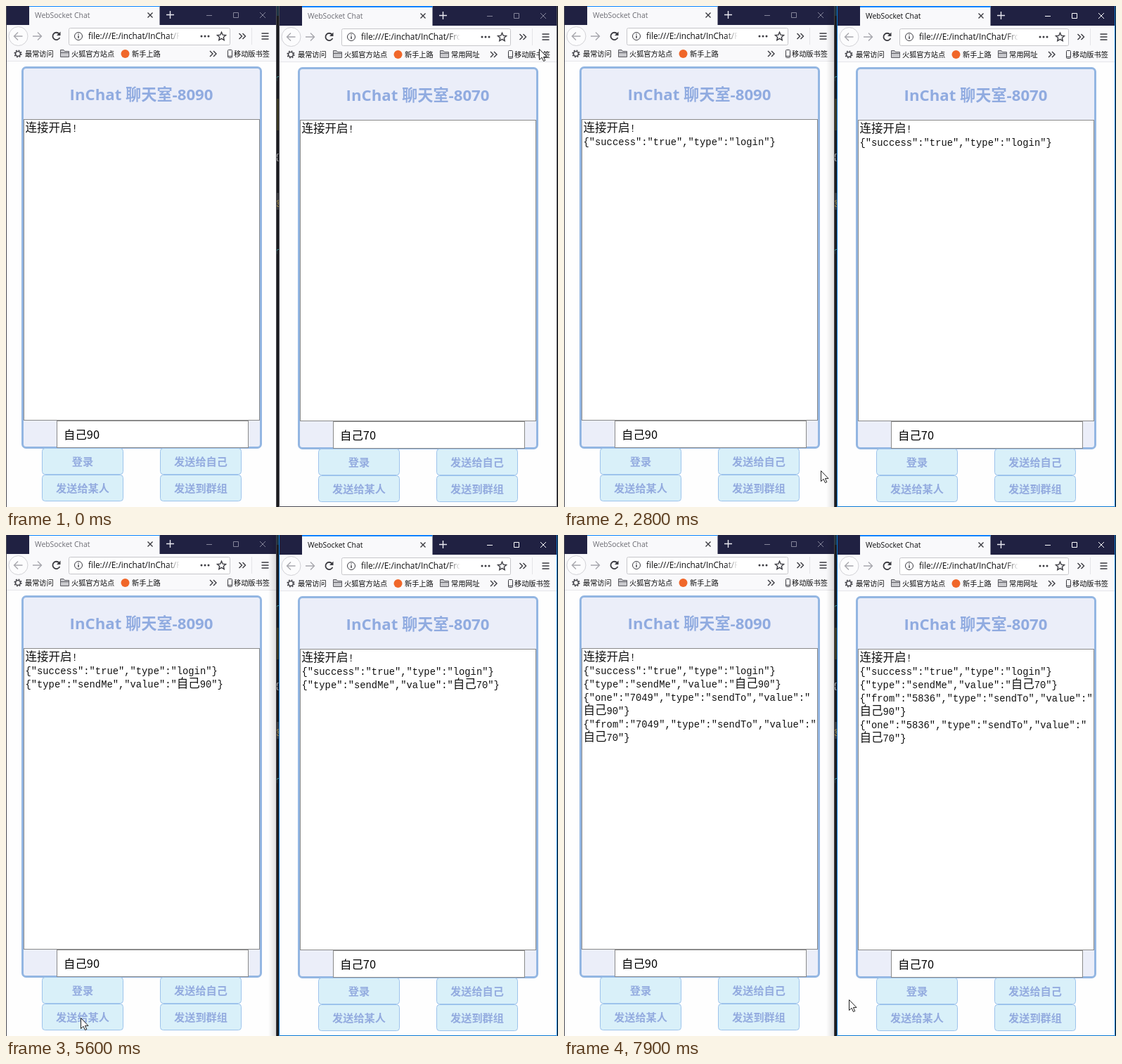
These frames come from a looping animation (785x713 px, 8000 ms). An HTML page:

```html
<!DOCTYPE html>
<html lang="zh-CN">
<head>
<meta charset="utf-8">
<title>WebSocket Chat</title>
<style>
html, body { margin: 0; width: 100%; height: 100%; overflow: hidden; background: #1d1d20; }
svg { display: block; width: 785px; height: 713px; cursor: default; }
text { font-family: "Open Sans", "Noto Sans CJK SC", "Noto Sans CJK", sans-serif; fill: #0c0c0d; }
.ui { font: 10.2px "Noto Sans CJK SC", "Noto Sans CJK", sans-serif; }
.url { font-size: 11.8px; }
.tab { font-size: 10.4px; fill: #6d6d74; }
.title { font-size: 22.2px; font-weight: 700; fill: #90abe0; text-anchor: middle; }
.btn { font: 700 15.2px "Noto Sans CJK SC", "Noto Sans CJK", sans-serif; fill: #93abdf; text-anchor: middle; }
.input { font: 16.4px "Noto Sans CJK SC", "Noto Sans CJK", sans-serif; fill: #000; }
.msg { font: 13.8px "Liberation Mono", monospace; fill: #111; }
.msg tspan { font: 300 16.5px "Noto Sans CJK SC", "Noto Sans CJK", sans-serif; }
.line { fill: none; stroke: #3a3a40; stroke-width: 1.4; }
.off { stroke: #a8a8ae; }
.thin { stroke-width: 1; }
.folder { fill: #c9c9cd; stroke: #5c5c62; stroke-width: 1; }
.plus { stroke: #e8e8f0; }
.caption { fill: none; stroke: #85859a; }
.edge { fill: none; stroke: #4a4a52; }
.field { fill: #fff; stroke: #8a8a8a; }
.field.hover { stroke: #111; }
.on .tab { fill: #0c0c0d; }
.on .caption { stroke: #fff; }
.on .edge { stroke: #0a78d4; }
</style>
</head>
<body>
<svg id="stage" viewBox="0 0 785 713"></svg>
<script>
const LOOP = 8000, STEP = 100;
const stage = document.getElementById('stage');

// chrome, page and end are the x offsets of the left, centred and right-hand parts
const windows = [
  { port: 8090, me: '自己90', chrome: 0, page: 0, end: 0, y: 0, width: 385 },
  { port: 8070, me: '自己70', chrome: 388, page: 393, end: 399, y: 1, width: 396 }
];

const messages = [
  [
    [0, '连接开启!'],
    [1000, '{"success":"true","type":"login"}'],
    [3200, '{"type":"sendMe","value":"自己90"}'],
    [5900, '{"one":"7049","type":"sendTo","value":"'],
    [5900, '自己90"}'],
    [7500, '{"from":"7049","type":"sendTo","value":"'],
    [7500, '自己70"}']
  ], [
    [0, '连接开启!'],
    [2100, '{"success":"true","type":"login"}'],
    [4500, '{"type":"sendMe","value":"自己70"}'],
    [5900, '{"from":"5836","type":"sendTo","value":"'],
    [5900, '自己90"}'],
    [7500, '{"one":"5836","type":"sendTo","value":"'],
    [7500, '自己70"}']
  ]
];

// time, index of the focused window
const focus = [[0, -1], [900, 0], [2000, 1], [3100, 0], [4400, 1], [5800, 0], [7400, 1]];

// time, x, y of the pointer
const path = [
  [0, 758, 61], [300, 520, 280], [500, 250, 520], [700, 110, 645], [900, 110, 646],
  [1200, 619, 571], [1700, 535, 634], [2000, 508, 645], [2300, 504, 647], [2800, 365, 661],
  [3100, 287, 648], [3300, 290, 646], [3500, 342, 639], [3600, 430, 632], [3700, 483, 630],
  [3800, 483, 630], [4100, 548, 649], [4400, 655, 646], [4700, 658, 645], [4900, 600, 616],
  [5200, 380, 645], [5400, 150, 692], [5600, 106, 687], [6000, 106, 687], [6400, 330, 655],
  [6700, 510, 616], [6900, 503, 661], [7000, 504, 678], [7600, 504, 678], [7700, 478, 692],
  [7800, 440, 682], [7900, 405, 661]
];

const group = (x, y, body) => `<g transform="translate(${x} ${y})">${body}</g>`;
const rect = (x, y, w, h, attrs) => `<rect x="${x}" y="${y}" width="${w}" height="${h}" ${attrs}/>`;
const text = (x, y, cls, s) => `<text x="${x}" y="${y}" class="${cls}">${s}</text>`;
const line = (d, cls = 'line') => `<path d="${d}" class="${cls}"/>`;
const folder = x => line(`M${x + .5} 72.5V62.5H${x + 5}L${x + 6.5} 64.5H${x + 12.5}V72.5ZM${x + .5} 66.5H${x + 12.5}`, 'folder');
const chevrons = (x, y) => line(`M${x - 5} ${y - 4}l4 4-4 4M${x} ${y - 4}l4 4-4 4`);

function star(cx, cy) {
  const pts = Array.from({ length: 10 }, (_, i) => {
    const r = i % 2 ? 2.9 : 6.3, a = i * Math.PI / 5;
    return `${(cx + r * Math.sin(a)).toFixed(1)} ${(cy - r * Math.cos(a)).toFixed(1)}`;
  });
  return line(`M${pts.join('L')}Z`);
}

function gear(cx, cy) {
  return `<circle cx="${cx}" cy="${cy}" r="3.4" class="line"/>` +
    `<circle cx="${cx}" cy="${cy}" r="4.9" class="line" stroke-dasharray="1.9 1.95"/>`;
}

function tabAndNav(w) {
  return rect(33, -1, 185.5, 28, 'fill="#f9f9fb"') + rect(33, -1, 185.5, 2, 'fill="#0a84ff"') +
    text(41, 17, 'tab', 'WebSocket Chat') +
    line('M201.5 9.5l7 7M208.5 9.5l-7 7') +
    line('M228 12.5h11M233.5 7v11', 'line plus') +
    '<circle cx="17.5" cy="43" r="13.5" fill="#fcfcfd" stroke="#d2d2d6"/>' +
    line('M23.5 43H12M17 37.5L11.5 43l5.5 5.5M38 43h12M45 37.5l5.5 5.5-5.5 5.5', 'line off') +
    '<path d="M75.6 39.6A5.2 5.2 0 1 0 76.4 45" fill="none" stroke="#3a3a40" stroke-width="1.8"/>' +
    '<path d="M77.5 36.5v5.5h-5.5z" fill="#3a3a40"/>' +
    rect(89.5, 31.5, w.width - 156, 24, 'rx="2" fill="#fff" stroke="#c6c6ca"') +
    '<circle cx="103" cy="43" r="5.5" class="line thin"/>' + line('M103 42v4M103 39.5v1.3') +
    text(117, 47, 'url', 'file:///E:/inchat/InChat/' + (w.chrome ? 'Fro' : 'F')) +
    gear(17, 68) + text(27, 72, 'ui', '最常访问') +
    folder(77) + text(93, 72, 'ui', '火狐官方站点') +
    '<circle cx="169.5" cy="68" r="6" fill="#f0672a"/>' + text(179, 72, 'ui', '新手上路') +
    (w.chrome ? folder(229) + text(245, 72, 'ui', '常用网址') : '');
}

function tools() {
  return rect(230, 33, 17, 21, 'fill="url(#fade)"') + rect(246.5, 33, 24, 21, 'fill="#fff"') +
    [278, 283, 288].map(x => `<circle cx="${x}" cy="43" r="1.5" fill="#3a3a40"/>`).join('') +
    star(306.5, 43.5) + chevrons(336.5, 43) + rect(349, 31, 1, 24, 'fill="#e4e4e8"') +
    line('M363.5 39h10M363.5 43h10M363.5 47h10') +
    line('M285 13.5h8M323.5 9.5h7v7h-7zM361 9l8 8M369 9l-8 8', 'caption') +
    chevrons(295, 68) +
    rect(315.5, 62.5, 6, 11, 'rx="1" class="line thin"') + line('M316 71.5h5', 'line thin') +
    text(324, 71.5, 'ui', '移动版书签');
}

function button(x, y, label) {
  return rect(x + .5, y + .5, 115, 37, 'rx="4" fill="#d9f0f9" stroke="#9dc3ec"') +
    text(x + 58, y + 25, 'btn', label);
}

function chat(w, i) {
  const lines = messages[i].map(([at, s], n) =>
    `<text x="27.5" y="${(178.5 + 19.05 * n).toFixed(1)}" class="msg" data-at="${at}">` +
    s.replace(/[\u4e00-\u9fff]+/g, '<tspan>$&</tspan>') + '</text>').join('');
  return rect(23.5, 87.5, 339, 541, 'rx="5" fill="#ebeef9" stroke="#93b6e2" stroke-width="3"') +
    text(192.5, 133.5, 'title', `InChat 聊天室-${w.port}`) +
    rect(25.5, 161.5, 335, 428, 'class="field"') + lines +
    rect(72.5, 590.5, 272, 38, 'class="field"') + text(82, 616, 'input', w.me) +
    button(51, 629, '登录') + button(219, 629, '发送给自己') +
    button(51, 667, '发送给某人') + button(219, 667, '发送到群组');
}

function browser(w, i) {
  const W = w.width;
  return '<g class="win">' +
    group(w.chrome, w.y,
      rect(0, -1, W, 716, 'fill="#fefefe"') + rect(0, -1, W, 28, 'fill="#202142"') +
      rect(0, 27, W, 52, 'fill="#f9f9fb"') + rect(0, 78, W, 1, 'fill="#e6e6ea"') +
      tabAndNav(w)) +
    group(w.end, w.y, tools()) + group(w.page, w.y, chat(w, i)) +
    group(w.chrome, w.y, line(`M.5 -1V${i ? 711.5 : 715}H${W - .5}V-1`, 'edge')) + '</g>';
}

function gradient(id, color, from, to) {
  return `<linearGradient id="${id}"><stop stop-color="${color}" stop-opacity="${from}"/>` +
    `<stop offset="1" stop-color="${color}" stop-opacity="${to}"/></linearGradient>`;
}

// sliver of the editor behind both windows
const backdrop = rect(384, 0, 5, 713, 'fill="#1c1c1f"') + rect(384, 0, 5, 14, 'fill="#1d3444"') +
  rect(384, 132, 5, 45, 'fill="#3a3722"') + rect(384, 266, 5, 24, 'fill="#3a3a3c"') +
  [[107, 'r', '#3f9a9a'], [219, '{', '#b5b5b5'], [285, '@', '#b89a45'], [353, 'r', '#3f9a9a']]
    .map(([y, s, c]) => `<text x="383" y="${y}" style="fill:${c};font-size:13px">${s}</text>`).join('');

stage.innerHTML = '<defs>' + gradient('fade', '#fff', 0, 1) +
  gradient('toRight', '#000', .22, 0) + gradient('toLeft', '#000', 0, .14) + '</defs>' +
  backdrop + windows.map(browser).join('') +
  rect(385, 0, 15, 713, 'class="shade" fill="url(#toRight)"') +
  rect(373, 0, 12, 713, 'class="shade" fill="url(#toLeft)"') +
  '<g id="pointer"><path id="arrow" d="M.5.5V15.5L4 12.2 6.5 17.5 8.8 16.5 6.4 11.4H11Z" fill="#fff" stroke="#222"/>' +
  '<path id="beam" d="M-3-6.5H-1L0-5.5 1-6.5H3M0-5.5V5.5M-3 6.5H-1L0 5.5 1 6.5H3" fill="none" stroke="#222"/></g>';

const all = s => [...stage.querySelectorAll(s)];
const wins = all('.win'), shades = all('.shade'), rows = all('[data-at]');
const [pointer, arrow, beam] = ['pointer', 'arrow', 'beam'].map(id => document.getElementById(id));
const fields = all('.field').map((el, i) => {
  const w = windows[i >> 1], b = el.getBBox();
  return { el, x: b.x + w.page, y: b.y + w.y, w: b.width, h: b.height };
});

const show = (el, on) => el.setAttribute('visibility', on ? 'visible' : 'hidden');

function pointerAt(t) {
  const n = path.findIndex(p => p[0] > t);
  if (n < 0) return path[path.length - 1].slice(1);
  const [t0, x0, y0] = path[n - 1], [t1, x1, y1] = path[n];
  const k = (t - t0) / (t1 - t0);
  return [Math.round(x0 + (x1 - x0) * k), Math.round(y0 + (y1 - y0) * k)];
}

function render(now) {
  const t = Math.floor(now % LOOP / STEP) * STEP;
  const active = focus.filter(f => f[0] <= t).pop()[1];
  wins.forEach((el, i) => el.classList.toggle('on', i === active));
  shades.forEach((el, i) => show(el, i === active));
  rows.forEach(el => show(el, el.dataset.at <= t));

  const [x, y] = pointerAt(t);
  let typing = false;
  for (const f of fields) {
    const over = x > f.x && x < f.x + f.w && y > f.y && y < f.y + f.h;
    f.el.classList.toggle('hover', over);
    typing = typing || over;
  }
  pointer.setAttribute('transform', `translate(${x} ${y})`);
  show(arrow, !typing);
  show(beam, typing);
}

const start = performance.now();
function tick() {
  render(performance.now() - start);
  requestAnimationFrame(tick);
}
tick();
</script>
</body>
</html>
```
